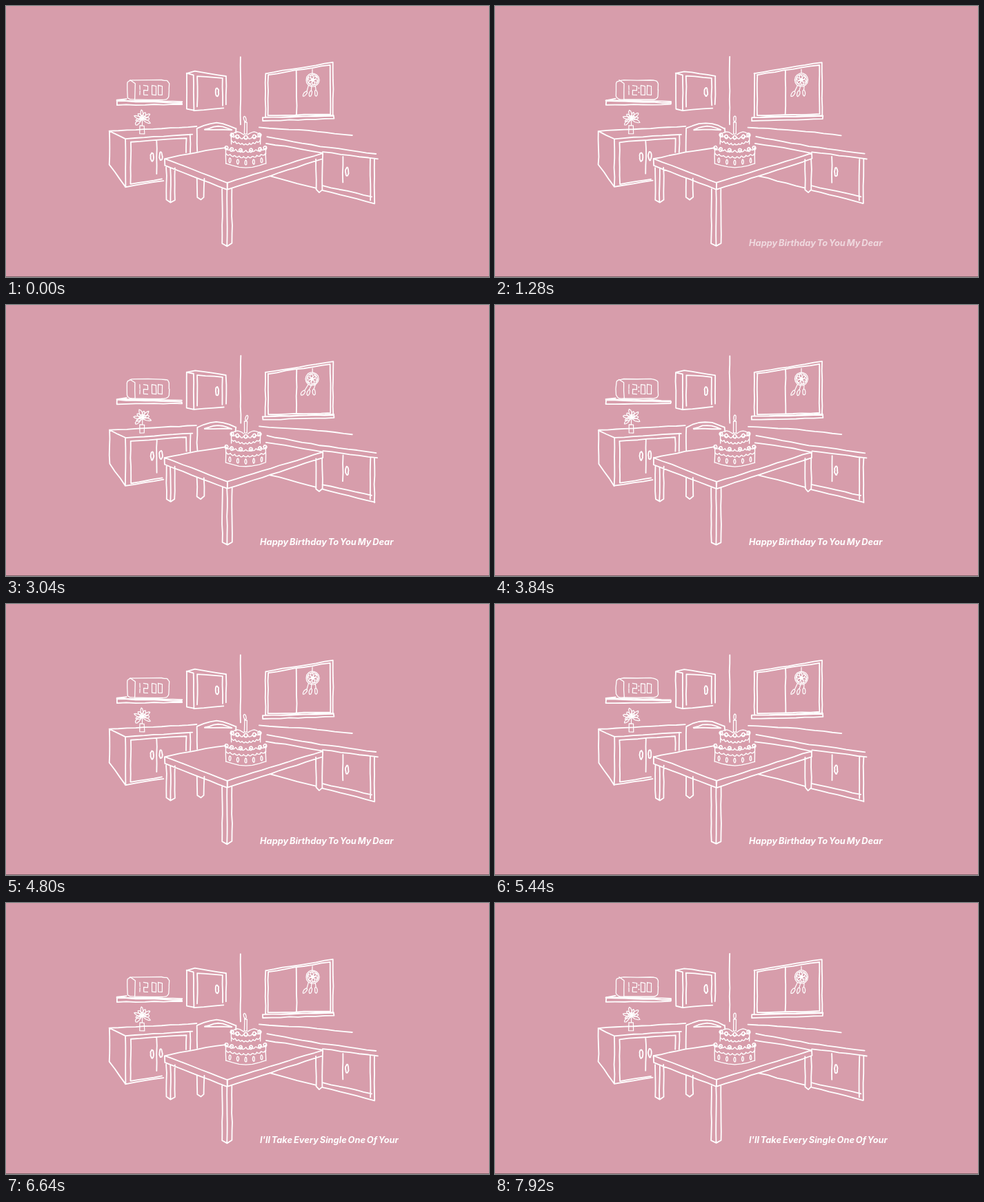
An HTML page for the animation above (8 s loop, 700 by 394 pixels).

```html
<!DOCTYPE html>
<html lang="en">
<head>
<meta charset="utf-8">
<title>Birthday room</title>
<style>
  html, body { margin: 0; width: 100%; height: 100%; overflow: hidden; background: #d79dab; }
  svg { display: block; width: 100vw; height: 100vh; }
  path { fill: none; stroke: #fff; stroke-linecap: round; stroke-linejoin: round; }
  text { font: italic 700 12.8px Inter, sans-serif; word-spacing: -1.15px; fill: #fff; }
</style>
</head>
<body>
<svg viewBox="0 0 700 394">
  <rect width="700" height="394" fill="#d79dab"/>
  <g id="room"></g>
  <text id="first" x="368" y="349">Happy Birthday To You My Dear</text>
  <text id="second" x="368" y="349">I'll Take Every Single One Of Your</text>
  <rect y="393" width="700" height="1" fill="#80666d"/>
</svg>
<script>
const LOOP = 8000, TICK = 80, POSES = 4;
const POSE_MS = 98.3, RESTART = 6640; // the redraw cycle starts over once
const TAU = Math.PI * 2;
const $ = id => document.getElementById(id);

let seed = 1;
const rand = () => {
  seed = (seed * 16807) % 2147483647;
  return seed / 2147483647 - 0.5;
};

const range = (n, f) => Array.from({ length: n }, (_, i) => f(i));
const mix = (a, b, u) => a + (b - a) * u;
const parse = s => s.split(' ').map(p => p.split(',').map(Number));

// Splits a polyline into short pieces and shakes every joint a little.
function wobble(pts, amp) {
  const shake = ([x, y]) => (x + rand() * amp).toFixed(2) + ' ' + (y + rand() * amp).toFixed(2);
  const out = [shake(pts[0])];
  for (let i = 1; i < pts.length; i++) {
    const [ax, ay] = pts[i - 1], [bx, by] = pts[i];
    const n = Math.max(1, Math.round(Math.hypot(bx - ax, by - ay) / 13));
    for (let j = 1; j <= n; j++) out.push(shake([mix(ax, bx, j / n), mix(ay, by, j / n)]));
  }
  return 'M' + out.join('L');
}

// Upright surface in perspective; maps u,v in 0..1 to the stage.
const face = (x0, top0, low0, x1, top1, low1) => (u, v) =>
  [mix(x0, x1, u), mix(mix(top0, top1, u), mix(low0, low1, u), v)];
const on = (at, s) => parse(s).map(([u, v]) => at(u, v));
const pane = (at, m = 0) =>
  [[m, m], [1 - m, m], [1 - m, 1 - m], [m, 1 - m], [m, m]].map(([u, v]) => at(u, v));

// A power below 1 squares the oval off.
const oval = (cx, cy, rx, ry, power = 1, n = 14) => range(n + 1, i => {
  const bend = v => Math.sign(v) * Math.abs(v) ** power, a = i / n * TAU;
  return [cx + rx * bend(Math.cos(a)), cy + ry * bend(Math.sin(a))];
});
const handle = ([x, y]) => oval(x, y, 2.2, 6.2);

// Bowed line, optionally hanging in loops like icing.
const bow = (x0, x1, y, sag, loops = 1, drop = 0) => range(loops * 6 + 1, i => {
  const u = i / (loops * 6);
  return [mix(x0, x1, u), y + sag * Math.sin(Math.PI * u) + drop * Math.abs(Math.sin(Math.PI * u * loops))];
});

function leaf(x, y, angle, len, wide) {
  const c = Math.cos(angle), s = Math.sin(angle);
  return range(9, i => {
    const a = i / 8 * TAU, u = len * (1 - Math.cos(a)) / 2, v = wide * Math.sin(a);
    return [x + c * u - s * v, y + s * u + c * v];
  });
}

const leg = (x, top, low, w) =>
  [[x - w, top], [x - w, low - 4], [x, low], [x + w, low - 4], [x + w, top]];
const upright = (x, top, low) => [[x, top], [x, low]];

function shelfAndClock(stroke, colon) {
  const shelf = face(161, 138, 144, 255, 141, 143);
  stroke([pane(shelf), '175,135 161,137 255,139']);
  stroke([oval(206, 122, 30.5, 14.3, .3, 28), '180,108 187,113 187,136'], 1.3);

  const cell = x => face(x, 115.5, 129, x + 6, 116.5, 129.5);
  const one = cell(194), two = cell(199.5);
  stroke([
    on(one, '0,0 0,.45'), on(one, '0,.55 0,1'),
    on(two, '0,0 1,0 1,.5 0,.5 0,1 1,1'),
    ...[211.5, 220.5].map(x => pane(cell(x))),
    ...(colon ? [119.5, 125.5].map(y => oval(208.5, y, .3, .3)) : [])
  ], 1.2, .4);
}

function wall(stroke) {
  stroke([upright(340, 74, 172)]);

  const side = face(262, 98, 150, 272, 100, 152), front = face(272, 100, 152, 319, 102, 148);
  stroke([
    pane(side), '262,98 274,95 319,102', on(front, '1,0 1,.9'), on(front, '0,1 .93,1'),
    on(front, '.11,.9 .11,.03 .89,.06 .89,.92'), handle(front(.72, .5))
  ]);

  const glass = face(376, 98, 162, 474, 82, 160);
  stroke([
    pane(glass), pane(glass, .04), on(glass, '.46,.04 .46,.95'),
    pane(face(372, 162, 167, 475, 159, 164))
  ]);
}

function cupboards(stroke) {
  const side = face(150, 182, 231, 173, 193, 263), front = face(173, 193, 263, 270, 186.5, 247);
  stroke([
    pane(side), '150,182 276,175', on(front, '0,0 1,0'), on(front, '0,1 .57,1'),
    on(front, '.55,.96 .08,.96 .08,.08 .91,.08 .91,.42'),
    on(front, '.97,0 .97,.43'), on(front, '.47,.08 .47,.82'),
    handle(front(.4, .44)), handle(front(.53, .44))
  ]);

  const counter = face(459, 212, 268, 534, 222, 287);
  stroke([
    '367,176.5 438,181 502,188', '378,190 455,204 536,215', '382,247 449,265',
    on(counter, '0,0 1.06,0'), on(counter, '0,1 1,1'), on(counter, '1,0 1,1'),
    on(counter, '.92,.02 .92,.95'), on(counter, '0,.88 .95,.86'),
    on(counter, '.39,.05 .39,.68'), handle(counter(.47, .4))
  ]);
}

function tableAndChair(stroke) {
  stroke([
    bow(277, 333, 178, -8), bow(288, 327, 180, -5), '288,180 327,180',
    upright(277, 178, 211), upright(333, 178, 184), leg(282, 251, 282, 5)
  ]);
  stroke([
    '318,206 275,213 230,222', '377,200 418,206 459,214',
    pane(face(230, 222, 232, 321, 257, 267)), pane(face(321, 257, 267, 459, 214, 222)),
    leg(238.5, 235, 286, 6), upright(238.5, 236, 285),
    leg(320.5, 266, 349, 7), upright(320.5, 267, 348),
    leg(454, 223, 271, 4.5)
  ]);
}

function cake(stroke, lean) {
  const cx = 347.5;
  const tier = (rx, top, low, berries) => {
    stroke([
      upright(cx - rx, top, low), upright(cx + rx, top, low),
      bow(cx - rx, cx + rx, top, 4, berries + 2, 2.5),
      bow(cx - rx, cx + rx, top + 8, 5, berries + 3, 2)
    ], 1.4, .7);
    stroke(range(berries, i => {
      const a = Math.PI * (i + .5) / berries;
      return oval(cx - Math.cos(a) * rx, top - 1 + Math.sin(a) * 5, 2.3, 2.7);
    }), 1.6, .5);
  };
  tier(21, 187, 201, 5);
  tier(29, 206, 229, 6);
  stroke([
    bow(cx - 29, cx + 29, 229, 6), bow(cx - 21, cx - 3, 187, -4), bow(cx + 3, cx + 21, 187, -4),
    pane(face(cx - 1.9, 169, 186, cx + 1.9, 169, 186)),
    leaf(cx, 168, -Math.PI / 2 - lean * .2, 8, 1.8),
    ...range(5, i => leaf(cx - 23 + i * 11.5, 221 + 3 * Math.sin(Math.PI * i / 4), Math.PI / 2, 7, 1.4))
  ], 1.3, .5);
}

function plant(stroke, lean) {
  stroke([
    ...range(8, i => leaf(198, 164, -3.5 + i * .56 + lean * .08, 10 + 3 * (i % 2), 2)),
    leaf(195, 165, 2.3, 11, 2.2),
    pane(face(194, 174, 186, 200.5, 174, 186)), upright(197.5, 165, 174)
  ], 1.2, .7);
}

function dreamcatcher(stroke, lean) {
  const cx = 444 + lean * .3, cy = 107.5;
  stroke([
    oval(cx, cy, 9.6, 9.6), oval(cx, cy, 7.8, 7.8), upright(444, 92, 98),
    ...range(6, i => leaf(cx, cy, i * TAU / 6 + .3, 7.5, 2)),
    ...range(3, i => [[438 + i * 5, 116], [434.5 + i * 6.5 + lean, 124 - i]]),
    ...range(3, i => leaf(434.5 + i * 6.5 + lean, 124 - i, 2.2 - i * .35, 9, 2))
  ], 1.2, .5);
}

const poses = range(POSES, pose => {
  const g = document.createElementNS('http://www.w3.org/2000/svg', 'g');
  $('room').append(g);
  seed = 977 + pose * 5153;
  const lean = Math.cos(pose * TAU / POSES) * 1.5;
  const stroke = (lines, width = 1.8, amp = .9) => {
    const path = document.createElementNS('http://www.w3.org/2000/svg', 'path');
    path.setAttribute('d', lines.map(l => wobble(typeof l === 'string' ? parse(l) : l, amp)).join(''));
    path.setAttribute('stroke-width', width);
    g.append(path);
  };
  shelfAndClock(stroke, pose % 2);
  wall(stroke);
  cupboards(stroke);
  tableAndChair(stroke);
  cake(stroke, lean);
  plant(stroke, lean);
  dreamcatcher(stroke, lean);
  return g;
});

const clamp = v => Math.max(0, Math.min(1, v));

function show(time) {
  const t = Math.floor((time % LOOP) / TICK) * TICK;
  const pose = Math.floor((t < RESTART ? t : t - RESTART) / POSE_MS) % POSES;
  poses.forEach((g, i) => g.style.display = i === pose ? '' : 'none');
  const rise = t < 1280 ? 0 : clamp(.62 + (t - 1280) / 600);
  $('first').style.opacity = rise * clamp((5840 - t) / 400);
  $('second').style.opacity = clamp((t - 5920) / 450);
}

const start = performance.now();
function frame() {
  show(performance.now() - start);
  requestAnimationFrame(frame);
}
show(0);
requestAnimationFrame(frame);
</script>
</body>
</html>
```
